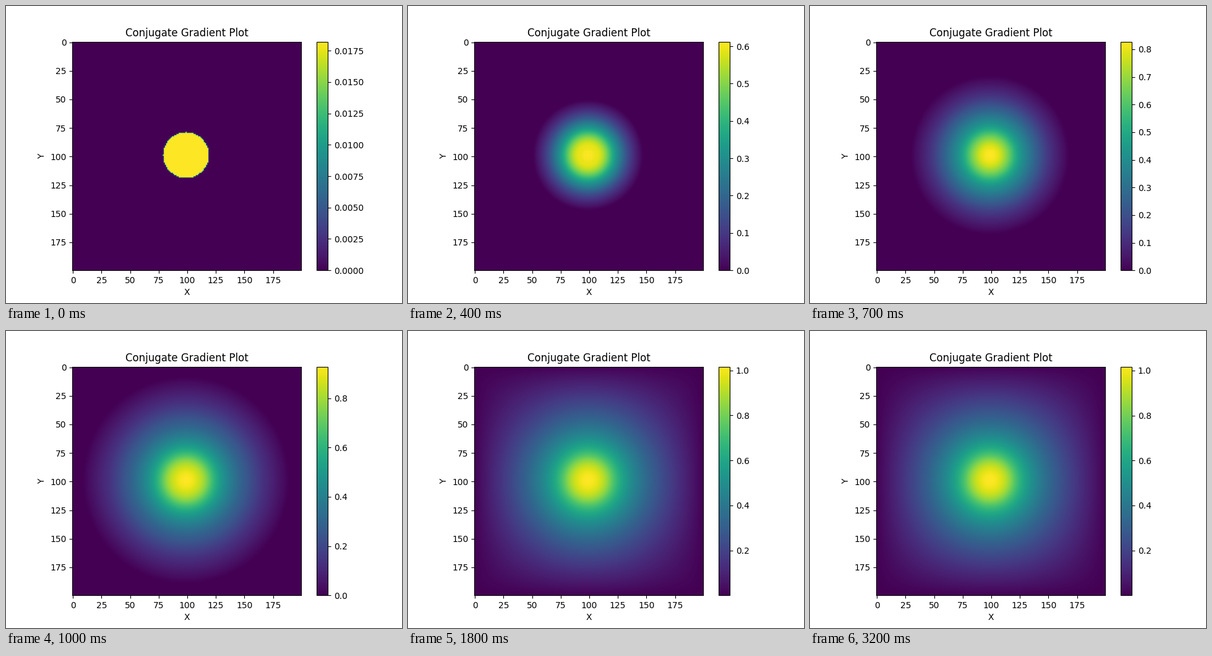
Recreate the animation shown at these times as a matplotlib script. Size 640 by 480 pixels, loop 6.4 s.

```python
import numpy as np
import matplotlib.pyplot as plt
from matplotlib.animation import FuncAnimation

SIZE = 200
CENTER = 99 - 1e-6   # nudged so ties on the rim fall to the upper left
RADIUS = 20
SOURCE = 0.00233
STEPS_PER_FRAME = 10
MOVING_FRAMES = 33
FRAMES = 64
INTERVAL = 100


def laplacian(u):
    """Negative five-point Laplacian with zero values outside the grid."""
    out = 4 * u
    out[1:] -= u[:-1]
    out[:-1] -= u[1:]
    out[:, 1:] -= u[:, :-1]
    out[:, :-1] -= u[:, 1:]
    return out


def solve():
    """Conjugate gradient iterates for a uniform disc source."""
    y, x = np.mgrid[:SIZE, :SIZE]
    disc = (x - CENTER) ** 2 + (y - CENTER) ** 2 <= RADIUS ** 2
    residual = SOURCE * disc
    solution = np.zeros((SIZE, SIZE))
    direction = residual.copy()
    norm = np.sum(residual ** 2)
    snapshots = []
    for step in range((MOVING_FRAMES - 1) * STEPS_PER_FRAME + 1):
        image_of_direction = laplacian(direction)
        alpha = norm / np.sum(direction * image_of_direction)
        solution = solution + alpha * direction
        residual = residual - alpha * image_of_direction
        new_norm = np.sum(residual ** 2)
        direction = residual + new_norm / norm * direction
        norm = new_norm
        if step % STEPS_PER_FRAME == 0:
            snapshots.append(solution)
    return snapshots


snapshots = solve()

fig, ax = plt.subplots(figsize=(6.4, 4.8), dpi=100)
image = ax.imshow(snapshots[0], cmap="viridis")
fig.colorbar(image, ax=ax)
ax.set_title("Conjugate Gradient Plot")
ax.set_xlabel("X")
ax.set_ylabel("Y")


def update(frame):
    data = snapshots[min(frame, MOVING_FRAMES - 1)]
    image.set_data(data)
    image.set_clim(data.min(), data.max())
    return [image]


animation = FuncAnimation(fig, update, frames=FRAMES, interval=INTERVAL,
                          init_func=lambda: update(0), repeat=True,
                          repeat_delay=0, blit=False)
plt.show()
```
